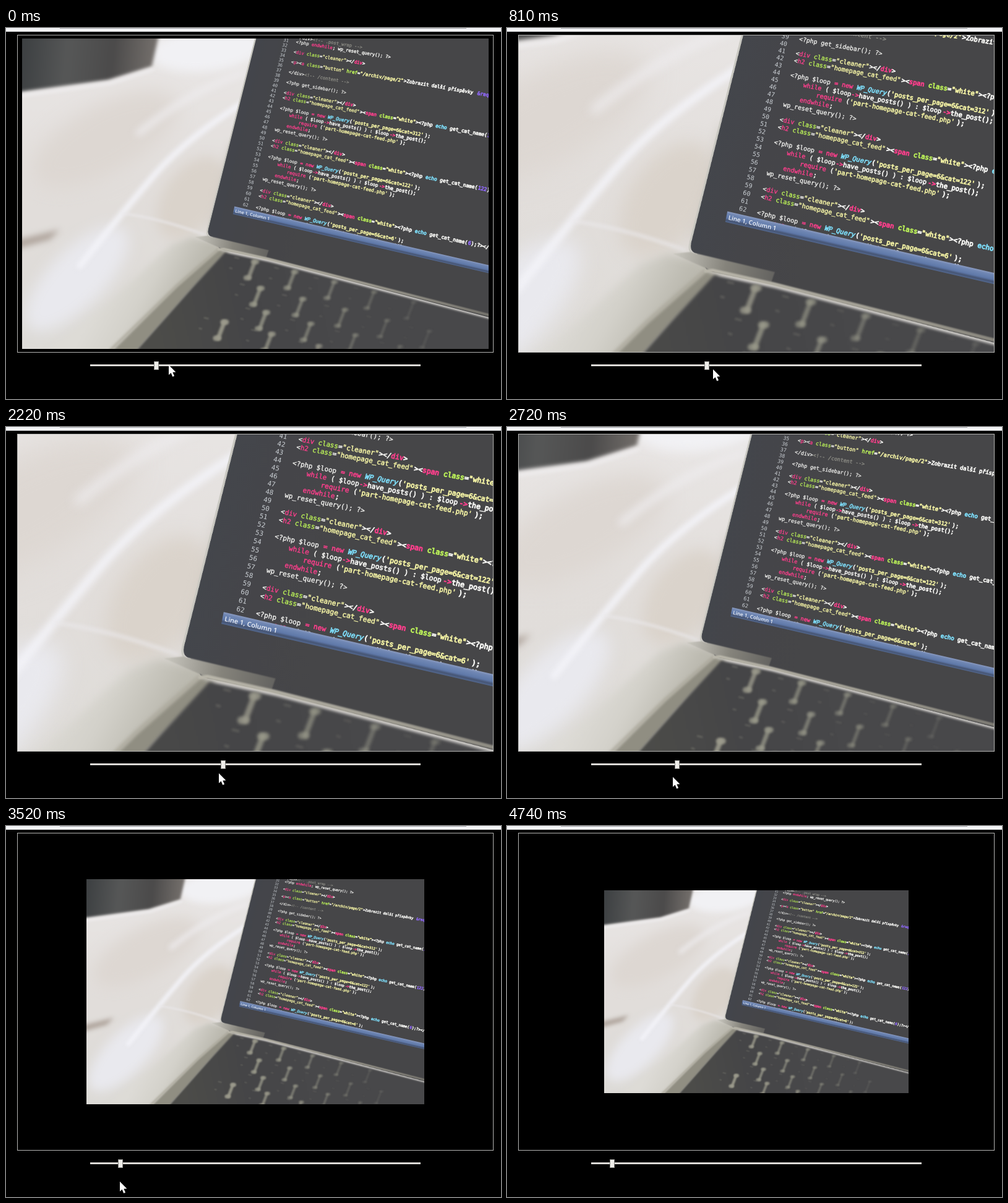
Animation of 800 by 600 pixels, one loop 5.61 s. Source, as an HTML page with a canvas:

```html
<!DOCTYPE html>
<html lang="en">
<head>
<meta charset="utf-8">
<title>Photo zoom slider</title>
<style>
html, body { margin: 0; width: 100%; height: 100%; overflow: hidden; background: #000; }
canvas { display: block; }
</style>
</head>
<body>
<canvas id="stage" width="800" height="600"></canvas>
<script>
const ctx = document.getElementById('stage').getContext('2d');
const LOOP = 5610;
const CX = 403, CY = 268, BASE_W = 752;
const MONO = '"DejaVu Sans Mono", "Liberation Mono", monospace';

/* ---------- motion ---------- */

const lerp = (a, b, u) => a + (b - a) * u;

// Index of the current step of a drag, as a share of all its steps.
const stepped = (t, start, gap, count) =>
  Math.min(count, Math.max(0, Math.floor((t - start) / gap))) / count;

function pose(t) {
  if (t < 1820) {
    const u = stepped(t, -30, 140, 9), e = u ** 1.5;
    return { handle: lerp(242.1, 390.5, e), x: lerp(263, 392, e), y: lerp(545, 556, u), pointer: true };
  }
  const u = stepped(t, 1810, 130, 16), e = 1 - (1 - u ** 1.38) ** 1.93;
  const away = t >= 4590;
  return {
    handle: lerp(390.5, 169.5, e),
    x: away ? 262 : lerp(392, 170, e ** 0.9),
    y: away ? 582 : lerp(556, 576, e),
    pointer: t < 4740
  };
}

/* ---------- photo backdrop, painted once ---------- */

const RES = 2, LEFT = 27, TOP = 17;
const photo = document.createElement('canvas');
photo.width = 752 * RES;
photo.height = 502 * RES;
const p = photo.getContext('2d');
p.setTransform(RES, 0, 0, RES, -LEFT * RES, -TOP * RES);
p.lineCap = p.lineJoin = 'round';

function ramp(x0, y0, x1, y1, ...colors) {
  const g = p.createLinearGradient(x0, y0, x1, y1);
  colors.forEach((c, i) => g.addColorStop(i / (colors.length - 1), c));
  return g;
}

function soft(blur) {
  p.filter = blur ? `blur(${blur * RES}px)` : 'none';
}

function area(path, fill, blur = 0) {
  soft(blur);
  p.fillStyle = fill;
  p.fill(new Path2D(path));
}

function line(path, color, width, blur = 0) {
  soft(blur);
  p.strokeStyle = color;
  p.lineWidth = width;
  p.stroke(new Path2D(path));
}

function patch(x, y, rx, ry, tilt, color, blur) {
  soft(blur);
  p.fillStyle = color;
  p.beginPath();
  p.ellipse(x, y, rx, ry, tilt, 0, 7);
  p.fill();
}

function paintCloth() {
  p.fillStyle = ramp(0, 17, 0, 519, '#eae7e6', '#e2dedb', '#dddbd7');
  p.fillRect(0, 0, 800, 540);
  patch(325, 35, 90, 35, -0.1, '#f1f1f4', 8);
  patch(160, 180, 130, 55, -0.5, '#ddd7d2', 16);
  patch(300, 275, 45, 75, 0.6, '#dad3cb', 10);
  patch(115, 405, 110, 45, -0.8, '#e9e9ee', 12);
  line('M385 72 Q300 100 215 170', '#eeecee', 9, 6);
  line('M383 121 Q290 180 240 238 T120 385', '#f3f3f8', 9, 4);
  line('M190 300 Q250 308 320 334', '#eae8ea', 3, 2);
  line('M332 318 L365 190', '#cec7bf', 7, 6);
  area('M15 344 L88 326 L72 342 L15 358Z', '#afa49c', 5);
  area('M10 0 H250 L236 62 L165 84 L10 105Z',
    ramp(27, 40, 245, 60, '#3d4042', '#565757', '#4b4a4a', '#77726e'), 3);
  line('M20 110 L170 89 L238 67', '#efedee', 5, 3);
}

function paintKeyGaps() {
  const ink = '#9d9c8d';
  for (let row = 0; row < 4; row++) {
    for (let k = -1; k < 5; k++) {
      if (k < 0 && row < 3) continue;
      const x = 402 + 9 * row + (64 + 4 * row) * k;
      const y = 378 + 45 * row - 2 * row * row + 0.255 * (x - 402 - 9 * row);
      const size = 9 - (x - 350) / 80;
      p.globalAlpha = Math.max(0.16, 0.95 - (x - 330) / 420);
      line(`M${x} ${y} l-10 26`, ink, size * 0.75, 1.6);
      line(`M${x - 2} ${y} h5 M${x - 14} ${y + 26} h5`, ink, size, 1.6);
      // faint legend on the key to the left
      p.globalAlpha *= 0.4;
      line(`M${x - 32} ${y - 7} l6 1.5 M${x - 40} ${y + 10} l3 1`, ink, 2.4, 1.3);
    }
  }
  p.globalAlpha = 1;
}

function paintKeyboard() {
  area('M300 338 L424 360 L348 360 L190 530 H60 L160 450 L268 350Z',
    ramp(170, 410, 270, 465, '#dddbd6', '#d3d1ca', '#bbb9af'), 5);
  area('M343 358 L360 364 L303 420 L205 530 H165 L276 418Z', '#908e82', 2);
  line('M343 358 L276 417 L170 520', '#b1aea2', 4, 1.8);
  area('M354 363 L425 378 L810 478 V540 H195 L303 418Z',
    ramp(240, 480, 520, 420, '#4c4c49', '#454547', '#48484a'), 1.5);
  paintKeyGaps();
}

function paintLid() {
  area('M406.5 8 L327.5 323 Q324 336 334 338 L346 358 L422 374 L810 476 V8Z',
    ramp(350, 170, 500, 205, '#43464c', '#454549', '#464648'));
  line('M405.3 8 L326.5 323 Q323.5 334 328 337', '#c9c8c1', 2.2);
  area('M306 338 L326 336 L424.5 359.4 L420.5 371 L349 357Z',
    ramp(310, 340, 424, 365, '#c6c4bc', '#85837b', '#646360'), 0.6);
  line('M344 358 L352 357.5 L422 373 L810 472',
    ramp(345, 358, 779, 466, '#b9b6aa', '#a09d92', '#77756e'), 4, 0.8);
}

paintCloth();
paintKeyboard();
paintLid();

/* ---------- code on the screen ---------- */

const INK = { w: '#f5f5f2', p: '#fb3f8b', g: '#b9ee58', y: '#efeea2', b: '#7ddcf8', v: '#8c66f2', c: '#8b8b84' };

const div = 'w<~pdiv~g class~w=~y"cleaner"~w></~pdiv~w>';
const head = n => `w<~ph2~g class~w=~y"homepage_cat_feed"~w><~pspan~g class~w=~y"white"~w><?php ~becho~w get_cat_name(~v${n}~w);?></~pspan~w>`;
const query = n => `w<?php $loop ~p= new ~iWP_Query~w(~y'posts_per_page=6&cat=${n}'~w);`;
const block = n => [div, head(n), '', query(n),
  'w    ~pwhile~w ( $loop~p->~whave_posts() ) : $loop~p->~wthe_post();',
  "w        ~prequire~w (~y'part-homepage-cat-feed.php'~w);", 'w    ~pendwhile~w;', 'wwp_reset_query(); ?>', ''];

const FIRST = 30, LAST = 62;
const ROWS = [
  'w</div>~c<!-- .post_wrap -->',
  'w<?php ~pendwhile~w; wp_reset_query(); ?>', '', div, '',
  'w<~pp~w><~pa~g class~w=~y"button"~g href~w=~y"/archiv/page/2"~w>Zobrazit další příspěvky ~v&raquo;~w</~pa~w>', '',
  'w</div>~c<!-- /content -->', '', 'w<?php get_sidebar(); ?>', '',
  ...block(312), ...block(122), ...block(6).slice(0, 5)
];

// Writes a run at a row and column of the tilted screen; em is 10 units, a column 6.02.
function run(text, row, col, color, italic) {
  const i = row - 31;
  const y = 23 + 7.918 * i + 0.0222 * i * i;
  const x = 404 + 0.243 * (289 - y);
  const slope = 0.16 + 0.00026 * (y - 22);
  const step = 4.17 + 0.00056 * (y - 22);
  const dx = step * col * (1 + 0.0008 * col);
  const k = step * (1 + 0.0016 * col) / 6.02;
  ctx.save();
  ctx.transform(k, k * slope, -0.22 * k, k, x + dx, y + dx * slope);
  ctx.font = `${italic ? 'italic ' : ''}10px ${MONO}`;
  ctx.fillStyle = ctx.strokeStyle = color;
  ctx.fillText(text, 0, 3.3);
  if (col >= 0) {
    ctx.lineWidth = Math.min(0.9, 0.3 + 0.02 * col);
    ctx.strokeText(text, 0, 3.3);
  }
  ctx.restore();
}

function drawCode() {
  ROWS.forEach((src, n) => {
    const row = FIRST + n;
    if (row <= LAST) run(String(row), row, -4.85, '#c9ced3');
    if (!src) return;
    let col = 0;
    for (const part of src.split('~')) {
      const text = part.slice(1), italic = part[0] === 'i';
      run(text, row, col, INK[italic ? 'b' : part[0]], italic);
      col += text.length;
    }
  });
}

function drawStatusBar() {
  ctx.save();
  ctx.transform(1, 0.231, -0.2, 1, 369.3, 288.5);
  const g = ctx.createLinearGradient(0, 0, 0, 12.5);
  ['#8b9bc0', '#6f86b3', '#6780ae', '#5f78a8', '#465574', '#53688f']
    .forEach((c, i) => g.addColorStop(i / 5, c));
  ctx.fillStyle = g;
  ctx.fillRect(0, 0, 440, 12.5);
  ctx.fillStyle = '#f2f4f8';
  ctx.font = '600 7px "Open Sans", "DejaVu Sans", sans-serif';
  ctx.fillText('Line 1, Column 1', 2.5, 9);
  ctx.restore();
}

/* ---------- stage ---------- */

function clipTo(x, y, w, h) {
  ctx.beginPath();
  ctx.rect(x, y, w, h);
  ctx.clip();
}

function drawPhoto(width) {
  const k = width / BASE_W;
  const x = Math.round(CX - width / 2), y = Math.round(CY - width / 3);
  const w = 2 * (CX - x), h = 2 * (CY - y);
  ctx.save();
  clipTo(19, 12, 768, 512);
  clipTo(x, y, w, h);
  ctx.imageSmoothingQuality = 'high';
  ctx.drawImage(photo, x, y, w, h);
  ctx.translate(CX, CY);
  ctx.scale(k, k);
  ctx.translate(-CX, -CY);
  drawCode();
  drawStatusBar();
  ctx.restore();
}

function box(x, y, w, h, color) {
  ctx.fillStyle = color;
  ctx.fillRect(x, y, w, h);
}

function drawPointer(x, y) {
  ctx.save();
  ctx.translate(x, y);
  ctx.fillStyle = '#fff';
  ctx.fill(new Path2D('M0 0 V16 L3.6 12.8 L6.3 19 L9 17.8 L6.4 11.8 L11.4 11.4Z'));
  ctx.restore();
}

function draw(t) {
  const { handle, x, y, pointer } = pose(t);
  box(0, 0, 800, 600, '#000');
  box(0, 0, 800, 6, '#f3f4f7');
  box(87, 0, 657, 1, '#a2a3a8');

  drawPhoto(492 + 3.6 * (handle - 169.5));
  ctx.strokeStyle = '#b4b4b2';
  ctx.strokeRect(18.5, 11.5, 769, 513);

  box(136, 544, 534, 3, '#dcdad6');
  const hx = Math.round(handle - 3.5);
  box(hx, 539, 8, 14, '#8a8a86');
  box(hx + 1, 540, 6, 12, '#efeeea');

  if (pointer) drawPointer(Math.round(x), Math.round(y));
}

const start = performance.now();
function tick() {
  draw((performance.now() - start) % LOOP);
  requestAnimationFrame(tick);
}
tick();
</script>
</body>
</html>
```
